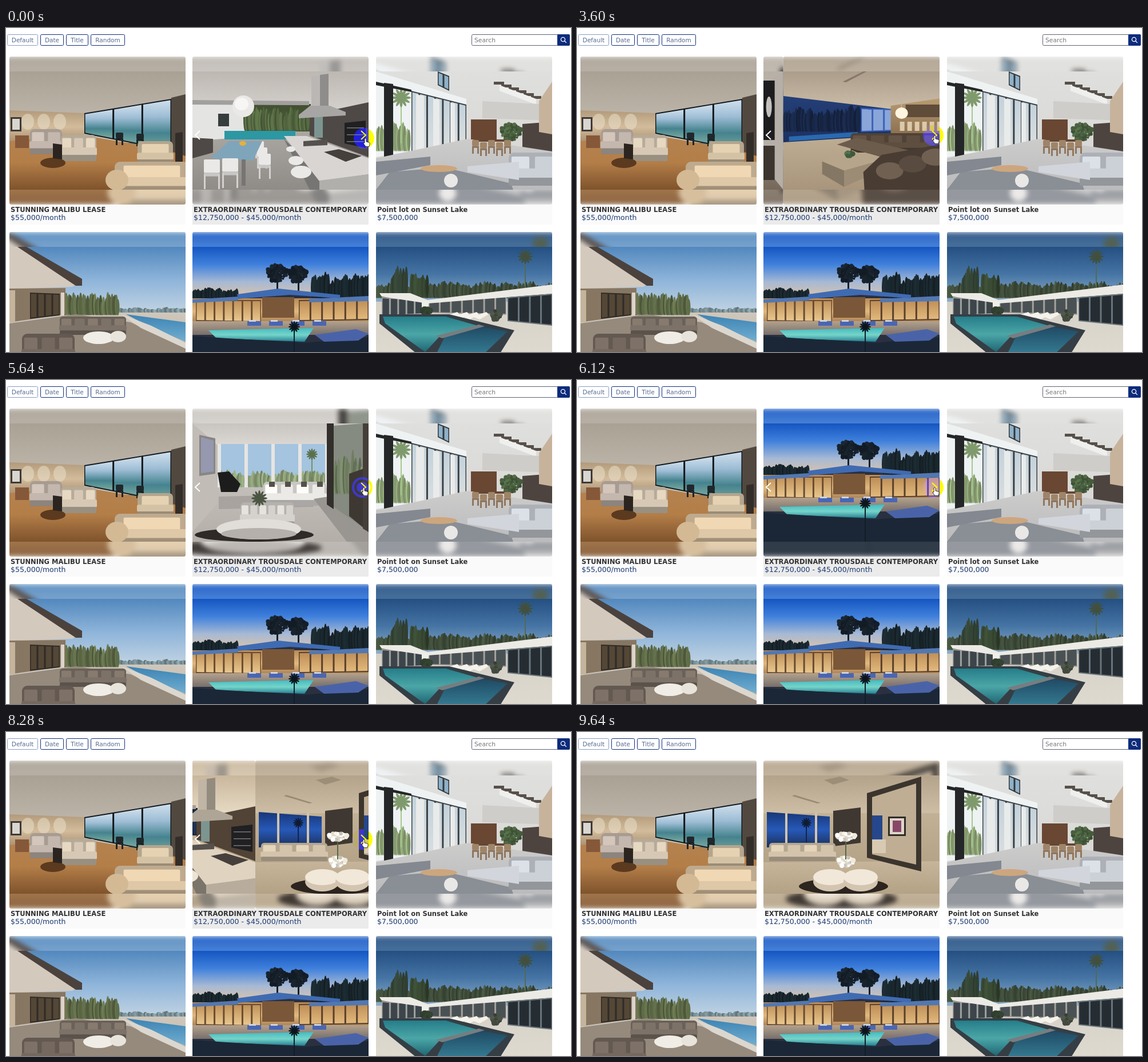
An HTML page for the animation above (10000 ms loop, 988x567 px).

```html
<!DOCTYPE html>
<html lang="en">
<head>
<meta charset="utf-8">
<title>Listings</title>
<style>
html, body { margin: 0; width: 100%; height: 100%; overflow: hidden; background: #fff; }
svg { display: block; width: 988px; height: 567px; font-family: "DejaVu Sans", sans-serif; }
.xor { mix-blend-mode: difference; }
</style>
</head>
<body>
<svg id="stage" viewBox="0 0 988 567"></svg>
<script>
const LOOP = 10000, W = 308, H = 207, CARD = 259, SLIDE = 300;
const CLICKS = [2320, 3360, 4480, 5640, 6840, 8040];
const STARTS = [2390, 3420, 4560, 5700, 6890, 8169];
const COLS = [6, 326, 647], ROWS = [50, 357];

const clamp = v => Math.min(1, Math.max(0, v));
const smooth = v => v * v * (3 - 2 * v);
const mix = (a, b, k) => a + (b - a) * k;
const repeat = (n, fn) => Array.from({ length: n }, (_, i) => fn(i)).join('');
const noise = n => { const v = Math.sin(n * 127.1 + 3.7) * 43758.5; return v - Math.floor(v); };

// "a>b>c" becomes a vertical gradient.
const grads = new Map();
function paint(fill) {
  if (!fill.includes('>')) return fill;
  if (!grads.has(fill)) grads.set(fill, 'g' + grads.size);
  return `url(#${grads.get(fill)})`;
}
const gradient = ([fill, id]) => `<linearGradient id="${id}" x2="0" y2="1">` +
  fill.split('>').map((c, i, all) => `<stop offset="${i / (all.length - 1)}" stop-color="${c}"/>`).join('') +
  '</linearGradient>';
const dim = (hex, k) => '#' + [1, 3, 5].map(i =>
  Math.min(255, Math.round(parseInt(hex.slice(i, i + 2), 16) * k)).toString(16).padStart(2, '0')).join('');

// Basic shapes
const box = (x, y, w, h, fill, more = '') =>
  `<rect x="${x}" y="${y}" width="${w}" height="${h}" fill="${paint(fill)}" ${more}/>`;
const oval = (x, y, a, b, fill, more = '') =>
  `<ellipse cx="${x}" cy="${y}" rx="${a}" ry="${b}" fill="${paint(fill)}" ${more}/>`;
const poly = (fill, points) => `<polygon points="${points}" fill="${paint(fill)}"/>`;
// Upright wall in perspective: x range, top edge, bottom edge
const wall = (x0, x1, t0, t1, b0, b1, fill) => poly(fill, `${x0},${t0} ${x1},${t1} ${x1},${b1} ${x0},${b0}`);
const band = (y0, y1, fill) => box(0, y0, W, y1 - y0, fill);

// Scenery
function glass(x0, x1, t0, t1, b0, b1, panes, frame, fill) {
  const top = k => mix(t0, t1, k) + 2, low = k => mix(b0, b1, k) - 2, pad = 1.5 / (x1 - x0);
  return wall(x0, x1, t0, t1, b0, b1, frame) + repeat(panes, i => {
    const a = i / panes + pad, b = (i + 1) / panes - pad;
    return wall(mix(x0, x1, a), mix(x0, x1, b), top(a), top(b), low(a), low(b), fill);
  });
}
const trees = (x, y, w, h, fill) => repeat(Math.ceil(w / 2.5), i => {
  const tall = h * (.5 + .25 * noise(x + i) + .25 * noise(x + (i >> 2)));
  return oval(x + i * 2.5, y - tall / 2, 3, tall / 2, dim(fill, .8 + .45 * noise(i + y)));
});
const canopy = (x, y, a, b, fill) => repeat(50, i => {
  const d = Math.sqrt(i / 50), r = 2 + 2.5 * noise(i);
  return oval(x + a * d * Math.cos(i * 2.4), y + b * d * Math.sin(i * 2.4), r, r, dim(fill, .8 + .4 * noise(i + x)));
});
const palm = (x, y, r, trunk, fill) => box(x - 1, y, 2, trunk, dim(fill, 1.3)) +
  repeat(12, i => oval(x + r / 2, y, r / 2, r / 7, fill, `transform="rotate(${i * 30} ${x} ${y})"`));
const sofa = (x, y, w, h, fill, seats = 3) =>
  box(x, y, w, h * .8, dim(fill, .85), `rx="${h / 6}"`) +
  repeat(seats, i => box(x + w * (i + .12) / seats, y + h * .12, w * .76 / seats, h * .4, dim(fill, i % 2 ? 1 : 1.08), 'rx="2"')) +
  box(x - 1, y + h * .48, w + 2, h * .3, fill, 'rx="3"') +
  box(x, y + h * .76, w, h * .24, dim(fill, .72), 'rx="2"');
const chair = (x, y, w, h, fill) => box(x, y, w, h * .45, fill, 'rx="2"') +
  box(x, y + h * .45, w, h * .12, dim(fill, .85)) +
  repeat(2, i => box(x + i * (w - 3), y + h * .5, 3, h * .5, dim(fill, .9)));
const art = (x, y, w, h, frame, fill) => box(x, y, w, h, frame) + box(x + 3, y + 3, w - 6, h - 6, fill);
const orchid = (x, y, fill) => canopy(x, y + 44, 14, 8, fill) + box(x - 1, y, 2, 40, '#56664a') + canopy(x, y, 17, 6, fill);
const table = (x, y, w, h, fill) =>
  poly(dim(fill, .72), `${x},${y + h * .3} ${x + w * .4},${y + h * .55} ${x + w * .4},${y + h} ${x},${y + h * .65}`) +
  poly(dim(fill, .85), `${x + w * .4},${y + h * .55} ${x + w},${y + h * .3} ${x + w},${y + h * .6} ${x + w * .4},${y + h}`) +
  poly(fill, `${x},${y + h * .3} ${x + w * .55},${y} ${x + w},${y + h * .3} ${x + w * .4},${y + h * .55}`);

const SEA = '#cfdfec>#9dbdd5>#45838e>#79a9a0';

function kitchen({ ceil, floor, side, leaf, dark, top, seat, table }) {
  return band(0, 70, ceil) + band(66, H, floor) +
    wall(0, 92, 57, 57, 122, 115, side) + box(45, 74, 19, 22, '#373c3c') +
    box(92, 57, 115, 48, dim(leaf, .8)) + trees(92, 104, 112, 46, leaf) +
    wall(56, 180, 104, 104, 119, 119, '#2b98a4') +
    wall(0, 204, 50, 52, 58, 59, dim(top, .75)) +
    wall(205, W, 76, 54, 112, 150, dark) + box(213, 78, 15, 38, '#7d9590') +
    wall(266, 303, 90, 86, 126, 134, '#202022') + repeat(3, i => box(270, 98 + i * 12, 30, 1.5, '#777')) +
    wall(208, 238, 8, 4, 62, 66, dim(top, .86)) + wall(223, 238, 6, 4, 62, 66, dim(top, .66)) +
    poly(dim(top, .78), '206,60 240,60 268,71 268,77 186,82 186,76') +
    wall(0, 36, 116, 118, 152, 142, dark) +
    poly(dim(top, .55), '160,118 224,180 222,207 205,207') +
    poly(top, '160,113 200,113 308,152 308,180 222,192') + wall(222, W, 191, 180, H, H, dim(top, .82)) +
    poly('#45403c', '230,141 256,136 296,148 268,158') + wall(194, 236, 122, 119, 131, 129, '#55514d') +
    repeat(3, i => oval(172 + i * 9, 136 + i * 20, 8 + i * 5, 5 + i * 3, seat)) +
    repeat(3, i => chair(110 + i * 3, 122 + i * 11, 15 + i * 3, 30 + i * 7, seat)) +
    poly(table, '32,152 64,122 122,122 106,156') + box(86, 154, 7, 46, dim(top, .55)) +
    repeat(2, i => chair(20 + i * 32, 154 - i * 2, 28, 52, seat)) +
    oval(88, 126, 6, 4, '#e5b13c') + oval(89, 61, 19, 19, seat) + oval(86, 57, 12, 11, '#fff', 'opacity=".6"');
}

const scenes = {
  bedroom: band(0, 125, '#aaa195>#c8c0b4') +
    wall(0, 131, 68, 73, 126, 116, '#b29a7b>#d2bc9b>#a78b6b') +
    repeat(3, i => oval(32 + i * 28, 88, 11, 14, '#eadfc9', 'opacity=".55"')) +
    poly('#b5824e>#b37e48>#7f532c', '0,122 130,112 283,138 308,142 308,207 0,207') +
    glass(131, 283, 73, 48, 109, 139, 3, '#12171b', SEA) +
    repeat(2, i => chair(186 + i * 36, 107 + i * 2, 13, 22, '#1f282c')) +
    wall(283, W, 46, 40, 140, 148, '#51483f') + art(2, 80, 19, 25, '#3d3b39', '#d8d6cf') +
    box(10, 112, 24, 22, '#85583a') + sofa(36, 101, 56, 44, '#c4b7ad', 2) +
    sofa(90, 111, 62, 46, '#d6c8b4') + oval(76, 160, 22, 9, '#5b3a1f') +
    wall(76, 92, 126, 128, 152, 154, '#2c241f') +
    sofa(224, 122, 62, 42, '#d4c2a5', 1) + wall(290, 303, 108, 106, 160, 165, '#332d29') +
    sofa(184, 158, 130, 56, '#dfc8a7', 1) + oval(188, 190, 20, 18, '#d3b994'),

  lounge: band(0, H, '#dfdfdd>#d6d5d2') + wall(0, 158, 0, 48, 150, 124, '#eef2f3') +
    trees(0, 140, 60, 60, '#8a9f73') + palm(44, 46, 17, 80, '#7f9a6c') +
    glass(62, 158, 34, 58, 150, 124, 7, '#3a4043', '#c3d2dc>#d9dedf') +
    repeat(3, i => wall(70 + i * 30, 84 + i * 27, 40 + i * 7, 43 + i * 7, 144 - i * 7, 140 - i * 7, '#e9ebea')) +
    wall(0, 62, 18, 32, 24, 36, '#242628') + wall(14, 30, 20, 22, 158, 152, '#242628') +
    glass(108, 128, 0, 8, 24, 34, 2, '#30383c', '#8fb0c8') +
    repeat(6, i => box(206 + i * 13, 18 + i * 5, 18, 5, '#57504a')) +
    wall(216, 280, 24, 48, 34, 58, '#efefee') + wall(186, W, 52, 58, 82, 86, '#cfcdca') +
    box(166, 84, 45, 38, '#694732') + wall(256, W, 92, 88, 138, 142, '#4d4440') +
    wall(285, W, 52, 18, 106, 110, '#c7b39c') +
    poly('#cdcccb>#bbbbbc', '0,152 160,118 256,132 308,140 308,207 0,207') +
    canopy(236, 106, 18, 15, '#4a6140') + box(178, 119, 50, 4, '#654732') +
    repeat(5, i => chair(168 + i * 14, 120 + i % 2 * 4, 12, 24, '#a08467')) +
    poly('#8a8e95', '24,176 120,168 236,196 240,207 0,207') +
    wall(0, 95, 158, 149, 182, 164, '#838891') +
    sofa(232, 142, 82, 58, '#ccd0d7', 2) + wall(160, 250, 166, 158, 176, 190, '#d2d5db') +
    oval(110, 170, 32, 6, '#cda67e') + oval(131, 191, 12, 12, '#e9e8e6'),

  patio: band(0, 118, '#5288be>#8fb5da>#c4d5e3') + band(112, H, '#d0c8bc>#b8aea1') +
    trees(170, 115, 138, 10, '#768c93') + trees(92, 120, 98, 44, '#5b6745') +
    poly('#d3c9bd', '0,0 24,0 122,62 110,70 0,74') + poly('#4b423e', '14,0 30,0 127,56 127,68 116,68') +
    wall(0, 98, 73, 72, 132, 118, '#877661') + box(0, 76, 10, 56, '#c5b49c') +
    glass(36, 88, 80, 82, 126, 120, 4, '#2f2b28', '#544736') + box(90, 80, 6, 40, '#dcd5ca') +
    poly('#958a7c', '0,134 116,118 212,132 308,178 308,207 0,207') +
    poly('#3c83b4>#72aed0', '204,118 308,132 308,166 246,140') +
    poly('#dcd7ce', '196,118 248,138 308,168 308,178 230,142') +
    sofa(88, 122, 116, 32, '#7d7268', 5) + sofa(22, 152, 92, 56, '#75695f', 3) +
    oval(156, 159, 27, 11, '#f0ede6') + oval(190, 157, 14, 10, '#e8e4dc'),

  dusk: band(0, 92, '#1455c2>#3f80dc>#a7b9d4>#e2c5a4') + band(84, H, '#2a3040') +
    canopy(148, 46, 18, 15, '#16202a') + canopy(184, 48, 16, 14, '#16202a') +
    repeat(2, i => box(147 + i * 37, 48, 3, 32, '#16202a')) +
    trees(0, 92, 80, 24, '#18252b') + trees(210, 90, 98, 48, '#18252b') +
    band(90, 136, '#b98a56>#e0b87e>#9d7449') +
    glass(6, 120, 93, 93, 130, 132, 7, '#6b4c33', '#c0925a>#e9c78d') + box(122, 88, 56, 36, '#7a5738') +
    glass(186, W, 93, 91, 130, 128, 6, '#5a3f2c', '#bd8e57>#e2b97c') +
    wall(0, 80, 92, 87, 98, 94, '#5277b2') + wall(204, W, 91, 86, 97, 95, '#5277b2') +
    poly('#3f6bb3', '78,83 150,73 258,84 258,90 170,84 80,91') +
    band(130, 154, '#b3a18c>#776f6c') +
    poly('#3fbcc4>#76d4c9>#237e91', '28,146 212,142 196,166 42,160') +
    poly('#1b2736', '0,156 60,160 196,168 308,158 308,207 0,207') +
    repeat(4, i => box(96 + i * 38, 130, 24, 8, '#4966b4') + box(99 + i * 38, 128, 12, 3, '#cfd3dc')) +
    poly('#4a63a8', '214,154 286,144 308,152 290,164 230,166') + palm(178, 140, 10, 67, '#0d161d'),

  poolside: band(0, 96, '#244f82>#4675a5>#91afc8') +
    trees(0, 90, W, 32, '#3d4a38') + trees(28, 88, 26, 68, '#2f3d30') + trees(62, 88, 28, 46, '#34432f') +
    palm(261, 17, 13, 60, '#41503f') + band(96, H, '#d6d1c7>#e1dcd2') +
    glass(10, 82, 88, 92, 122, 118, 5, '#9fa2a0', '#3d454a') +
    glass(92, 228, 95, 86, 116, 119, 7, '#a4a29b', '#4a5154') +
    poly('#eceae5', '6,81 60,81 90,93 308,66 308,82 232,88 90,99 10,87') +
    box(80, 95, 12, 23, '#f0eee9') + glass(230, W, 88, 82, 130, 138, 4, '#68757c', '#262d32') +
    canopy(88, 113, 8, 6, '#32402f') + canopy(210, 120, 8, 8, '#434b40') +
    repeat(4, i => poly('#f5f2ec', `${118 + i * 17},122 ${142 + i * 17},114 ${146 + i * 17},118 ${130 + i * 17},127`)) +
    poly('#353e45', '6,118 128,118 242,146 204,207 96,207 6,134') +
    poly('#257d89>#4ba6a7>#1f6674', '12,122 122,122 178,138 112,156 86,184 16,134') +
    poly('#204a65>#367e94', '120,158 186,140 230,148 186,190 104,190') +
    poly('#777d80', '104,156 180,136 190,139 116,160'),

  kitchenDay: kitchen({
    ceil: '#bdb8b2>#d5d1cc', floor: '#b5b1ac>#8f8b87', side: '#e4e4e2', leaf: '#52653f',
    dark: '#4e4946', top: '#d8d5d2', seat: '#ebe9e7', table: '#7fa5bb'
  }),

  gallery: band(0, 150, '#b8b0a6>#c9c2b8') + band(120, H, '#9d8d7b>#75685b') +
    glass(60, 210, 46, 46, 116, 116, 3, '#5b544c', '#7c90a8>#405249') +
    sofa(70, 120, 136, 44, '#c8bfb3') + oval(146, 180, 50, 12, '#65513f') +
    wall(262, W, 30, 0, 150, H, '#b5afa8') + box(273, 16, 20, 104, '#1d1d1f') +
    oval(283, 62, 5, 18, '#c4c2bf') + box(273, 130, 20, 60, '#3c342e'),

  night: band(0, 70, '#ab9d8b>#cdbfa9') + band(66, H, '#c9b99f>#a8957c') +
    poly('#857868', '104,18 140,0 146,0 110,19') +
    wall(0, 190, 43, 66, 124, 112, '#243f78>#1c3160') + trees(0, 106, 134, 50, '#172544') +
    glass(136, 196, 64, 66, 106, 104, 3, '#3b62b8', '#8aa6d8') + wall(10, 130, 114, 106, 122, 114, '#2a69b0') +
    wall(188, W, 60, 42, 112, 122, '#bd9f74>#83684b') + box(214, 58, 94, 22, '#5f4c39') +
    repeat(7, i => box(204 + i * 13, 88, 8, 16, '#dbcaaa')) + band(0, 0, '#000000') +
    box(206, 40, 1.5, 24, '#c0b5a3') + oval(207, 73, 11, 10, '#fff5df') +
    sofa(118, 108, 156, 34, '#5d4e40', 5) + poly('#6c5c4c', '94,128 128,116 220,138 200,158') +
    table(68, 138, 96, 64, '#b7a58b') + canopy(116, 145, 6, 3, '#476443') +
    poly('#493c32', '140,176 172,146 308,122 308,207 142,207') +
    repeat(3, i => oval(186 + i * 40, 174 - i * 12, 24, 15, i % 2 ? '#594b3f' : '#6f6051')),

  salon: band(0, 44, '#c8c4bf>#dedbd7') + band(38, H, '#cfcac5>#b3aea8') +
    box(44, 36, 192, 76, '#a4c4df') + trees(46, 112, 188, 32, '#899b74') + palm(209, 54, 10, 40, '#5a704c') +
    repeat(5, i => box(44 + i * 47, 36, 6, 76, '#e6e5e2')) +
    poly('#c1bcb6', '0,0 44,38 44,140 0,190') + wall(12, 40, 20, 26, 92, 88, '#888683') +
    wall(15, 37, 24, 30, 87, 84, '#9698b0') +
    poly('#1d1c1c', '44,86 64,84 84,106 78,120 50,120') + wall(46, 212, 128, 124, 150, 146, '#a8a39e') +
    sofa(124, 102, 110, 42, '#eceae7', 4) + repeat(4, i => box(134 + i * 28, 102, 10, 9, '#55504a')) +
    poly('#999590', '212,132 238,128 308,170 308,207 270,207') +
    wall(247, 298, 4, 0, 146, 182, '#858b80') + trees(248, 124, 48, 86, '#707e62') +
    wall(235, 247, 0, 0, 142, 150, '#332f2c') + wall(274, W, 88, 76, 162, 190, '#3e3833') +
    wall(298, W, 0, 0, 184, 190, '#453f39') + oval(108, 195, 104, 12, '#2f2927') +
    sofa(84, 138, 94, 44, '#d5d1cd', 6) + oval(116, 185, 74, 18, '#e1ddd9') +
    oval(116, 193, 66, 10, '#b5b0ab') + palm(117, 131, 14, 8, '#4b5642'),

  kitchenNight: kitchen({
    ceil: '#c9b79d>#e8dcc6', floor: '#cbb99f>#ab977b', side: '#d0c4b4', leaf: '#1e3050',
    dark: '#514336', top: '#e0d3c0', seat: '#eee4d4', table: '#a8b3a2'
  }),

  foyer: band(0, 72, '#b4a38b>#d0c0a7') + band(66, H, '#c2b196>#ad9a7e') +
    poly('#9d8e78', '106,8 134,2 150,8 122,16') + poly('#9b8b74', '54,34 100,48 94,49 50,36') +
    wall(6, 116, 64, 72, 126, 120, '#173778>#2759b8>#1a2f59') + palm(75, 83, 9, 34, '#101c36') +
    repeat(2, i => box(38 + i * 52, 66, 4, 56, '#d3c4ab')) + wall(122, 170, 62, 56, 124, 118, '#3f3832') +
    sofa(10, 118, 116, 32, '#d3c4ab', 4) + wall(0, W, 152, 150, H, H, '#c6b59a>#b4a286') +
    wall(181, 276, 31, 2, 144, 168, '#3b352e') + wall(190, 267, 38, 14, 138, 156, '#bfae93') +
    box(190, 70, 18, 42, '#26478c') + box(190, 112, 24, 24, '#d8cab2') +
    art(218, 72, 31, 34, '#302b27', '#ded5c8') + box(226, 79, 15, 20, '#894768') +
    oval(140, 194, 78, 14, '#2c241e') +
    repeat(2, i => oval(117 + i * 53, 186, 30, 17, '#d3c5b0') + oval(117 + i * 53, 178, 30, 14, '#f1e8da')) +
    orchid(144, 107, '#f3ecdf')
};
const SLIDES = ['kitchenDay', 'gallery', 'night', 'salon', 'dusk', 'kitchenNight', 'foyer'];

// A sharp shot over a blurred, enlarged copy of itself
const photo = (name, x = 0) => `<g transform="translate(${x})"><g clip-path="url(#card)">
  <g filter="url(#soft)" opacity=".9"><g transform="translate(-38.5) scale(1.25)">${scenes[name]}</g></g>
  <g transform="translate(0 26)" clip-path="url(#shot)">${scenes[name]}</g></g></g>`;
const label = (x, y, size, fill, text, more = '') =>
  `<text x="${x}" y="${y}" font-size="${size}" fill="${fill}" ${more}>${text}</text>`;
const button = (x, w, text, line) =>
  box(x + .5, 11.5, w - 1, 19, '#fff', `rx="2" stroke="${line}"`) +
  label(x + w / 2, 25, 10.5, '#586a92', text, 'text-anchor="middle"');
const chevron = (x, dir) => `<path d="M${x + 4 * dir} 130l${-8 * dir} 7.5l${8 * dir} 7.5"/>`;

const cards = [
  ['bedroom', 'STUNNING MALIBU LEASE', '$55,000/month'],
  [null, 'EXTRAORDINARY TROUSDALE CONTEMPORARY', '$12,750,000 - $45,000/month'],
  ['lounge', 'Point lot on Sunset Lake', '$7,500,000'],
  ['patio'], ['dusk'], ['poolside']
];
const card = ([name, title, price], i) => `<g transform="translate(${COLS[i % 3]} ${ROWS[i / 3 | 0]})">
  ${box(0, CARD, W, 35, '#fafafa', 'class="cap"')}
  ${name ? photo(name) : `<g clip-path="url(#card)"><g id="strip">${SLIDES.map((s, k) => photo(s, k * W)).join('')}</g></g>`}
  ${title ? label(2, 271.5, 11.5, '#333', title, 'font-weight="bold"') + label(2, 286.3, 12.5, '#1d3b72', price) : ''}
  <g class="nav" fill="none" stroke="#fff" stroke-width="2">${chevron(9, 1)}${chevron(299, -1)}</g></g>`;

const stage = document.getElementById('stage');
const page = `${box(0, 0, 988, 567, '#fff')}
  ${button(2, 54, 'Default', '#8b9dc0')}${button(60, 41, 'Date', '#12307c')}
  ${button(105, 39, 'Title', '#12307c')}${button(148, 60, 'Random', '#12307c')}
  ${box(814.5, 11.5, 171, 19, '#fff', 'rx="2" stroke="#5d6474"')}
  ${box(964, 11, 22, 20, '#0d2b7c', 'rx="2"')}
  <g fill="none" stroke="#fff" stroke-width="1.3"><circle cx="974" cy="20" r="3.6"/><path d="M976.7 22.7l3.2 3.2"/></g>
  ${label(819, 25, 10.8, '#777', 'Search')}
  ${cards.map(card).join('')}
  <circle class="xor cur" r="18" fill="#00f"/>
  <circle class="xor cur" id="ring" fill="none" stroke="#00f" stroke-width="4"/>
  <path class="cur" d="M1 1q1.5-2 3 0v5l5 1.2q1.6.6 1.2 2.8l-1.4 4.5H3L-1 9q-.4-2 2-.8z" fill="#fff" stroke="#111" stroke-width=".8"/>`;
stage.innerHTML = `<defs>${[...grads].map(gradient).join('')}
  <clipPath id="card">${box(0, 0, W, CARD, '#000', 'rx="3"')}</clipPath>
  <clipPath id="shot">${box(0, 0, W, H, '#000')}</clipPath>
  <filter id="soft" filterUnits="userSpaceOnUse" x="0" y="0" width="${W}" height="${CARD}" color-interpolation-filters="sRGB">
    <feGaussianBlur stdDeviation="4"/></filter></defs>${page}`;

const strip = document.getElementById('strip'), ring = document.getElementById('ring');
const caps = [...stage.querySelectorAll('.cap')], navs = [...stage.querySelectorAll('.nav')];
const pointer = [...stage.querySelectorAll('.cur')];

// CSS "ease": cubic-bezier(.25, .1, .25, 1)
function ease(x) {
  if (x <= 0 || x >= 1) return clamp(x);
  const bez = (a, b, s) => 3 * a * s * (1 - s) ** 2 + 3 * b * s * s * (1 - s) + s ** 3;
  let lo = 0, hi = 1;
  for (let i = 0; i < 24; i++) {
    const m = (lo + hi) / 2;
    if (bez(.25, .25, m) < x) lo = m; else hi = m;
  }
  return bez(.1, 1, lo);
}

// Pointer key points: time, x, y
const PATH = [[40, 626, 193], [400, 623, 188], [8560, 623, 188], [9080, 652, 390], [9500, 738, 600]];
function pointerAt(t) {
  let p = PATH[0].slice(1);
  for (let i = 1; i < PATH.length; i++) {
    const [t0, x0, y0] = PATH[i - 1], [t1, x1, y1] = PATH[i];
    if (t > t0) {
      const k = smooth(clamp((t - t0) / (t1 - t0)));
      p = [mix(x0, x1, k), mix(y0, y1, k)];
    }
  }
  return p;
}

function draw(t) {
  const shift = STARTS.reduce((sum, s) => sum + ease((t - s) / SLIDE), 0);
  strip.setAttribute('transform', `translate(${-shift * W})`);

  const [x, y] = pointerAt(t);
  pointer.forEach(el => el.setAttribute('transform', `translate(${x} ${y})`));

  const since = Math.min(...CLICKS.map(c => t >= c ? t - c : LOOP));
  ring.setAttribute('r', 12 * (1 - clamp(since / 200)));
  ring.style.display = since < 200 ? '' : 'none';

  caps.forEach((cap, i) => {
    const dx = x - COLS[i % 3], dy = y - ROWS[i / 3 | 0];
    const over = dx >= 0 && dx < W && dy >= 0 && dy < 294 && y < 567;
    cap.setAttribute('fill', over ? '#ebebeb' : '#fafafa');
    navs[i].style.display = over ? '' : 'none';
  });
}

const begin = performance.now();
function tick() {
  draw((performance.now() - begin) % LOOP);
  requestAnimationFrame(tick);
}
tick();
</script>
</body>
</html>
```
